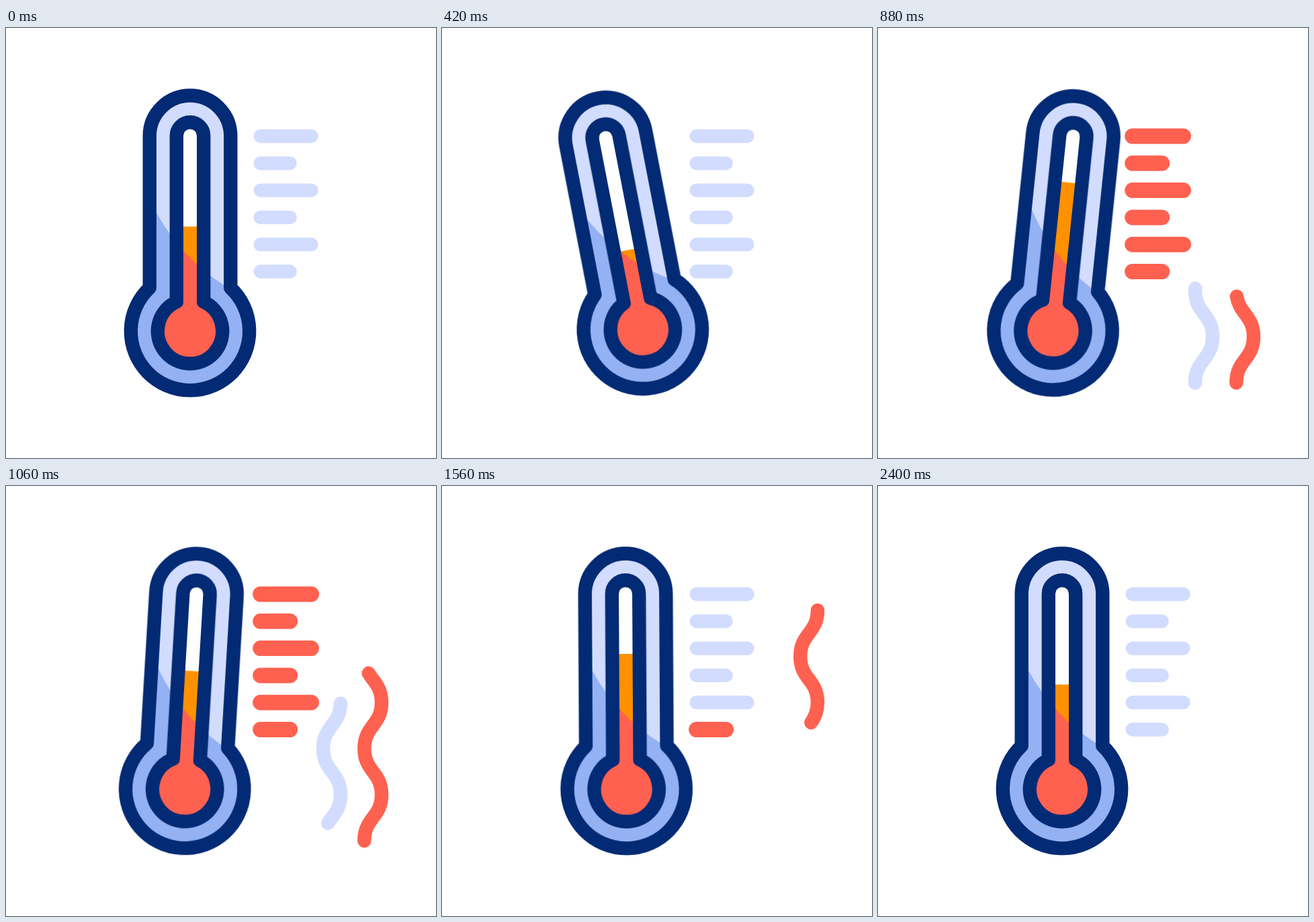
These frames come from a looping animation (640 px wide and 640 px high, 2420 ms). An HTML page without scripts:

```html
<!DOCTYPE html>
<html lang="en">
<head>
<meta charset="utf-8">
<title>Thermometer</title>
<style>
  @property --from { syntax: "<number>"; inherits: false; initial-value: 0; }
  @property --to { syntax: "<number>"; inherits: false; initial-value: 0; }

  :root {
    --navy: #032a74;
    --pale: #d2dcfe;
    --blue: #94b1f3;
    --red: #ff6150;
    --amber: #ff9100;
    --ease: cubic-bezier(.333, 0, .667, 1);
    --loop: 2420ms;
  }
  html, body { margin: 0; width: 100%; height: 100%; overflow: hidden; background: #fff; }
  svg { display: block; width: 100%; height: 100%; }

  .outline { fill: none; stroke: var(--navy); stroke-width: 20.4; stroke-linejoin: round; }
  .bars { fill: none; stroke-width: 20.3; stroke-linecap: round; stroke: var(--pale); }
  .hot { stroke: var(--red); stroke-width: 23; }

  .body { transform-origin: 274px 320px; animation: swing var(--loop) var(--ease) infinite; }
  .level { animation: slosh var(--loop) var(--ease) infinite; }
  .reveal { animation: reveal var(--loop) steps(6) infinite; }

  /* Each wave is trimmed between --from and --to along its length. */
  .wave {
    fill: none; stroke-width: 20.5; stroke-linecap: round;
    stroke-dasharray: max(.01px, calc((var(--to) - var(--from)) * 1px)) 300px;
    stroke-dashoffset: calc(var(--from) * -1px);
  }
  .wave.long {
    stroke: var(--red);
    animation: trim-long var(--loop) var(--ease) infinite, show-long var(--loop) step-end infinite;
  }
  .wave.short {
    stroke: var(--pale);
    animation: trim-short var(--loop) var(--ease) infinite, show-short var(--loop) step-end infinite;
  }

  @keyframes swing {
    0%, 66.94%, 100% { transform: rotate(0deg); }
    23.22% { transform: rotate(-13deg); }
    38.22% { transform: rotate(6.7deg); }
    53.31% { transform: rotate(-3.8deg); }
  }
  @keyframes slosh {
    0%, 88.43%, 100% { transform: translateY(295.5px); }
    18.18% { transform: translateY(331px); }
    33.88% { transform: translateY(225px); }
    53.72% { transform: translateY(325px); }
    67.77% { transform: translateY(238px); }
  }
  @keyframes reveal {
    0%, 17.355% { transform: translateY(241.8px); }
    34.711%, 48.76% { transform: translateY(0); }
    66.116%, 100% { transform: translateY(241.8px); }
  }
  @keyframes trim-long {
    0%, 23.55% { --to: 0; }
    54.34%, 100% { --to: 100; }
    0%, 47.02% { --from: 0; }
    81.32%, 100% { --from: 100; }
  }
  @keyframes show-long {
    0%, 81.32%, 100% { stroke-opacity: 0; }
    22.3% { stroke-opacity: 1; }
  }
  @keyframes trim-short {
    0%, 22.52% { --to: 0; }
    44.83%, 100% { --to: 100; }
    0%, 38.51% { --from: 0; }
    62.98%, 100% { --from: 100; }
  }
  @keyframes show-short {
    0%, 62.98%, 100% { stroke-opacity: 0; }
    22.3% { stroke-opacity: 1; }
  }
</style>
</head>
<body>
<svg viewBox="0 0 640 640">
  <defs>
    <path id="case" d="M213.7 386.8V160.8a60.3 60.3 0 0 1 120.6 0V386.8A88.2 88.2 0 1 1 213.7 386.8Z"/>
    <path id="tube" d="M253.8 407.6V160.4a20.2 20.2 0 0 1 40.4 0V407.6A48.2 48.2 0 1 1 253.8 407.6Z"/>
    <path id="shade" d="M214 257L224 275Q262.5 344 325 383L345 395H400V560H150V257Z"/>
    <path id="bars" d="M378.7 161H454.5M378.7 201.3H422.7M378.7 241.6H454.5M378.7 281.9H422.7M378.7 322.2H454.5M378.7 362.5H422.7"/>
    <clipPath id="in-case"><use href="#case"/></clipPath>
    <clipPath id="in-tube"><use href="#tube"/></clipPath>
    <clipPath id="lit"><rect class="reveal" x="350" y="140.9" width="140" height="241.8"/></clipPath>
  </defs>

  <use href="#bars" class="bars"/>
  <g clip-path="url(#lit)"><use href="#bars" class="bars hot"/></g>

  <path class="wave short" pathLength="100"
    d="M472 528c0-34.3 26-34.3 26-68.6s-26-34.3-26-68.6s26-34.3 26-68.6"/>
  <path class="wave long" pathLength="100"
    d="M533.3 528c0-34.3 25.7-34.3 25.7-68.6s-25.7-34.3-25.7-68.6s25.7-34.3 25.7-68.6s-25.7-34.3-25.7-68.6s25.7-34.3 25.7-68.6"/>

  <g class="body">
    <use href="#case" fill="var(--pale)"/>
    <g clip-path="url(#in-case)"><use href="#shade" fill="var(--blue)"/></g>
    <use href="#case" class="outline"/>
    <use href="#tube" fill="#fff"/>
    <g clip-path="url(#in-tube)">
      <rect class="level" x="220" width="110" height="160" fill="var(--amber)"/>
      <use href="#shade" fill="var(--red)"/>
    </g>
    <use href="#tube" class="outline"/>
  </g>
</svg>
</body>
</html>
```
